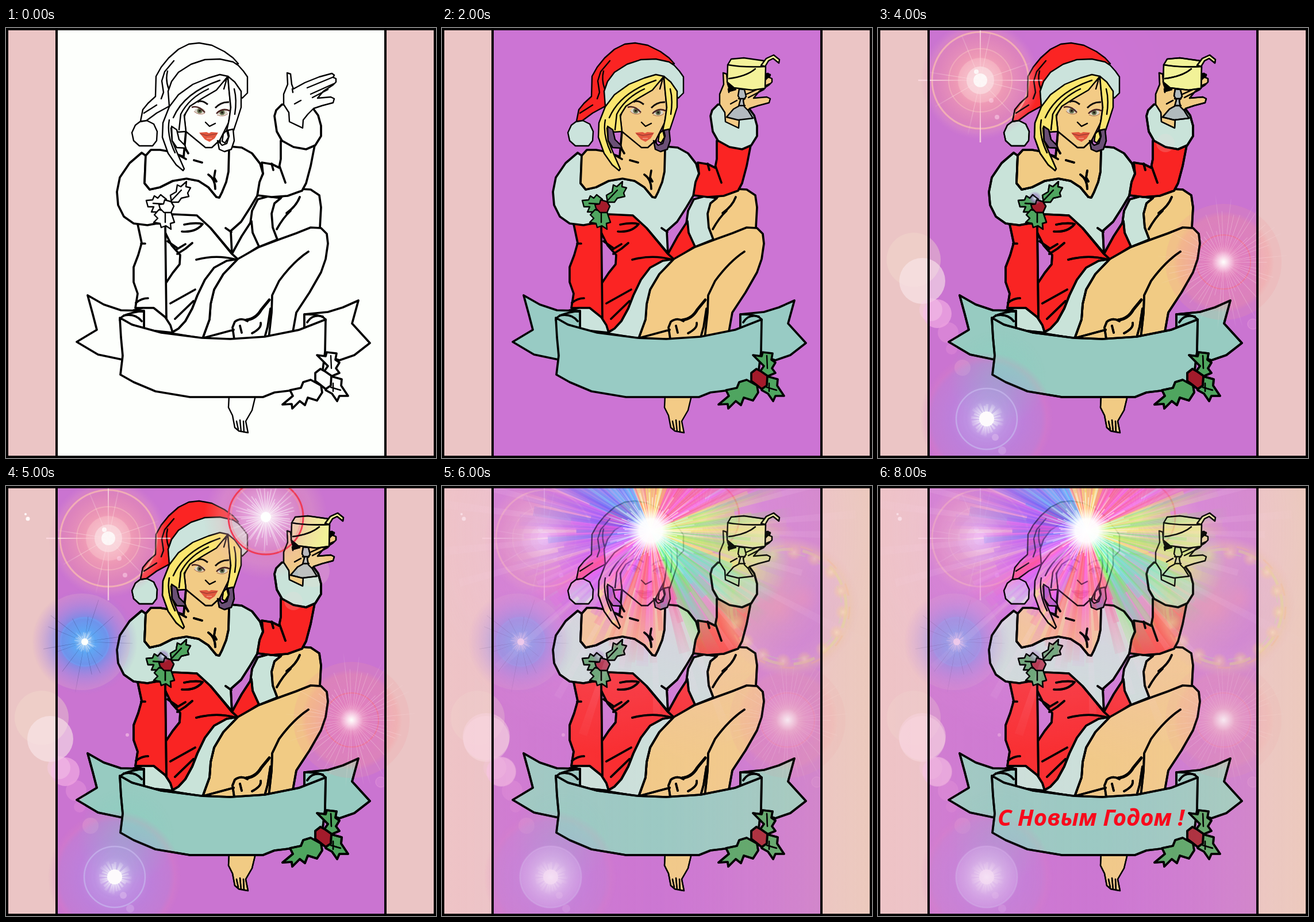
Animation of 748 by 748 pixels, one loop 9000 ms. Source, as an HTML page:

```html
<!DOCTYPE html>
<html lang="ru">
<head>
<meta charset="utf-8">
<title>С Новым Годом</title>
<style>
html, body { margin: 0; width: 100%; height: 100%; overflow: hidden; background: #ebc5c5; }
svg { display: block; width: 100vw; height: 100vh; }
.art path { stroke: #000; stroke-width: 3.7; stroke-linejoin: round; stroke-linecap: round; }
.art .thin path, .art path.thin { stroke-width: 2.4; }
.line { fill: none; }
.bg { fill: var(--bg, #fdfffc); }
.red { fill: var(--red, #fdfffc); }
.fur { fill: var(--fur, #fdfffc); }
.skin { fill: var(--skin, #fdfffc); }
.hair { fill: var(--hair, #fdfffc); }
.ring { fill: var(--ring, #fdfffc); }
.leaf { fill: var(--leaf, #fdfffc); }
.berry { fill: var(--berry, #fdfffc); }
.band { fill: var(--band, #fdfffc); }
.drink { fill: var(--drink, #fdfffc); }
.stem { fill: var(--stem, #fdfffc); }
.full {
  --bg: #cc74d4; --red: #fb2423; --fur: #cbe3dc; --skin: #f3cb86; --hair: #fbe66f; --ring: #6b4f76;
  --leaf: #4fa560; --berry: #a41b2b; --band: #98cbc4; --drink: #f4f29a; --stem: #b3bac0;
}
.ink { mix-blend-mode: multiply; }
.step { opacity: 0; animation: 9s step-end infinite; }
.paint { animation-name: paint; }
.glass { animation-name: glass; }
.fx1 { animation-name: fx1; }
.fx2 { animation-name: fx2; }
.fx3 { animation-name: fx3; }
.fx4 { animation-name: fx4; }
.fx5 { animation-name: fx5; }
.fx6 { animation-name: fx6; }
.flash { animation-name: flash; }
.text { animation-name: text; }
.kiss { animation-name: kiss; }
#flares { animation: dim 9s step-end infinite; }
@keyframes paint { 0% { opacity: 0 } 11.111%, to { opacity: 1 } }
@keyframes glass { 0% { opacity: 0 } 22.222%, to { opacity: 1 } }
@keyframes fx1 { 0% { opacity: 0 } 33.333%, to { opacity: 1 } }
@keyframes fx2 { 0% { opacity: 0 } 38.888%, to { opacity: 1 } }
@keyframes fx3 { 0% { opacity: 0 } 44.444%, to { opacity: 1 } }
@keyframes fx4 { 0% { opacity: 0 } 50%, to { opacity: 1 } }
@keyframes fx5 { 0% { opacity: 0 } 55.555%, to { opacity: 1 } }
@keyframes fx6 { 0% { opacity: 0 } 61.111%, to { opacity: 1 } }
@keyframes flash { 0% { opacity: 0 } 66.666%, to { opacity: 1 } }
@keyframes dim { 0% { opacity: 1 } 66.666%, to { opacity: .65 } }
@keyframes text { 0% { opacity: 0 } 72.222%, to { opacity: 1 } }
@keyframes kiss { 0% { opacity: 0 } 77.777% { opacity: 1 } 88.888%, to { opacity: 0 } }
text { font: italic 700 40px "Open Sans", "Noto Sans", sans-serif; fill: #f80a1c; }
</style>
</head>
<body>
<svg viewBox="0 0 748 748">
<defs id="defs"></defs>
<defs>
<g id="art" class="art">
  <rect class="bg" x="88" y="3" width="572" height="742"/>
  <!-- far leg and skirt edge -->
  <path class="skin" d="M465 302 490 288 512 280 530 281 545 291 548 312 546 348 530 352 472 370 462 345 462 320Z"/>
  <path class="line" d="M471 350Q482 330 495 318M511 294Q505 310 488 322"/>
  <path class="fur" d="M438 298 456 293 478 296 467 305 462 323 464 347 472 368 440 381 430 362 425 340 428 318Z"/>
  <!-- raised arm -->
  <path class="red" d="M437 291 440 268 447 254 445 234 463 237 475 243 478 228 478 196 537 204 530 240 522 270 515 283 490 292 462 294Z"/>
  <path class="line" d="M476 241 486 269M462 236 465 247"/>
  <path class="fur" d="M480 133 470 143 467 153 471 180 480 196 500 207 522 211 538 204 548 188 548 170 543 152 532 137Z"/>
  <g class="thin">
    <path class="skin" d="M489 78 495 80 497 98 500 106 520 95 545 85 567 79 571 82 569 86 574 88 574 94 569 99 552 110 542 122 565 120 571 123 569 130 550 135 535 140 525 150 517 160 516 174 493 163 492 147 483 133 483 115 490 98Z"/>
    <path class="line" d="M570 85 524 104M570 97 530 115M560 107 533 121M502 132 513 126M498 106 499 112"/>
  </g>
  <!-- dress -->
  <path class="red" d="M393 393 410 362 427 336 429 356 440 380 404 403Z"/>
  <path class="red" d="M270 340 292 323 333 323 356 348 393 393 404 403 384 405 362 417 346 438 333 465 324 488 312 510 300 523 289 529 278 505 278 444 290 426 302 411 303 395 288 378 279 360Z"/>
  <path class="red" d="M229 341 236 374 230 395 222 416 222 442 229 462 225 487 256 487 279 505 277 340Z"/>
  <path class="fur" d="M222 491 238 487 257 487 277 503 286 517 290 530 240 525Z"/>
  <path class="line" d="M306 354Q330 356 342 341Q330 338 310 342M330 322 341 328M281 371 297 382M298 393 312 384 324 374M297 385 312 376M331 403Q365 394 397 402M286 479 329 455M294 506 326 475M235 375 242 375M226 478Q236 470 247 470"/>
  <!-- near leg -->
  <path class="skin" d="M403 402 440 381 480 366 505 357 530 347 548 348 558 358 560 375 556 402 548 425 528 460 505 495 496 545 342 540 354 507 356 480 362 455 378 428Z"/>
  <path class="fur" d="M403 402 384 405 362 417 346 438 333 465 324 488 312 510 300 523 287 531 342 540 354 507 356 480 362 455 378 428Z"/>
  <path class="line" d="M526 389Q500 406 475 440L463 465 462 495 457 540M344 539 396 525M397 541 394 521 398 511Q409 503 420 510M407 518 410 530M443 513Q445 522 428 531M450 538 455 520 460 488"/>
  <path class="line" style="stroke-width:5" d="M418 508Q435 506 444 490L458 473"/>
  <g class="thin">
    <path class="skin" d="M388 640 387 660 394 674 398 695 405 701 421 704 417 684 428 665 434 640Z"/>
    <path class="line" d="M401 684 404 698M407 682 409 702M413 684 414 703"/>
  </g>
  <!-- collar and chest -->
  <path class="fur" d="M236 217 215 235 198 260 193 285 195 308 205 328 222 340 246 343 262 340 290 324 332 326 356 348 393 392 391 353 409 337 425 312 437 292 441 268 447 253 442 236 428 218 410 208 388 206 376 285 371 295 366 294 352 277 335 266 314 262 290 266 268 277 250 281 241 270 243 222Z"/>
  <path class="skin" d="M313 180 309 224 285 215 268 212 252 212 243 222 241 270 250 281 268 277 290 266 314 262 335 266 352 277 366 294 371 295 376 285 383 268 387 250 388 212 372 206 372 190Z"/>
  <path class="line" d="M310 206 317 218M327 230 341 234M304 223 313 228M364 248 362 260 366 267M352 255Q364 263 364 280M382 348 392 355"/>
  <!-- head -->
  <g class="thin">
    <path class="red" d="M234 162 238 142 247 131 260 119 261 84 270 68 283 52 300 37 318 28 336 26 358 30 380 41 395 52 404 62 372 70 320 90 284 136 262 148 243 162Z"/>
    <path class="line" d="M270 123 274 112 271 92 276 76 292 57M281 75Q277 90 283 106M240 148 262 134"/>
    <path class="fur" d="M233 163 245 161 257 167 263 180 262 196 255 205 232 205 222 196 219 182 225 169Z"/>
    <path class="fur" d="M282 110 288 93 300 77 322 63 346 55 372 54 395 59 404 65 413 75 420 85 420 113 411 122 390 100 300 125 284 136Z"/>
    <path class="skin" d="M313 180 330 194 347 208 358 208 372 195 387 165 391 140 386 88 340 118 316 138 310 155Z"/>
    <path class="hair" d="M386 84 398 94 409 110 409 138 402 160 396 178 384 178 388 160 391 138 388 108Z"/>
    <path class="ring" d="M395 176 397 196 392 211 380 215 371 211 368 196 376 204 384 201 388 188 386 178Z"/>
    <path class="hair" d="M378 184 384 178 387 190 381 200 376 197Z"/>
    <path class="hair" d="M386 84 372 81 352 87 325 98 300 116 284 137 273 165 272 190 282 218 296 238 308 248 310 245 299 220 289 196 287 174 300 181 313 180 310 152 320 136 342 122 366 108Z"/>
    <path class="ring" d="M288 171 297 177 301 194 311 204 313 209 297 208 289 196Z"/>
    <path class="line" d="M372 91Q310 112 291 156M352 106Q318 122 304 150L301 177M284 160Q279 186 294 217M383 92 379 106M397 106Q402 125 398 150M347 164 354 171 364 166"/>
  </g>
  <!-- holly -->
  <g class="thin">
    <path class="leaf" d="M286 291 296 285 298 273 304 276 314 267 313 276 321 278 316 287 318 293 305 296 300 303 288 303Z"/>
    <path class="leaf" d="M244 300 255 299 258 292 264 296 269 290 279 298 274 310 264 320 253 320 257 311 247 311Z"/>
    <path class="leaf" d="M266 316 258 325 264 331 257 338 268 340 270 347 278 344 287 350 286 340 293 338 287 320Z"/>
    <path class="line" d="M288 300 305 282M256 305 272 306M277 323 277 338"/>
    <path class="berry" d="M266 307 274 306 276 299 287 302 292 310 287 321 275 321 268 314Z"/>
  </g>
  <!-- ribbon -->
  <path class="band" d="M240 492 200 491 170 481 142 465 151 498 158 525 123 546 160 568 203 577V530L240 530Z"/>
  <path class="band" d="M519 498 560 494 586 486 613 474 602 514 633 548 606 569 580 578 556 570 519 530Z"/>
  <path class="band" d="M198 508Q200 497 240 492V524ZM556 508Q552 498 519 498V524Z"/>
  <path class="line" d="M205 500Q225 496 236 510M551 502Q533 497 524 512"/>
  <path class="band" d="M198 504 219 516 270 530 340 539 390 541 450 537 510 525 556 507 555 563 548 618 500 630 467 634 447 642 320 642 260 632 222 616 199 603 203 570 200 538Z"/>
  <path class="leaf" d="M541 569 556 571 558 564 575 566 573 577 580 582 574 592 580 600 566 606 553 598 560 588 553 581Z"/>
  <path class="leaf" d="M566 606 584 611 583 622 595 640 580 640 576 649 567 636 556 630Z"/>
  <path class="leaf" d="M548 622 530 612 517 616 513 626 494 630 499 640 481 655 497 654 498 662 511 649 520 656 525 643 541 648 550 634Z"/>
  <path class="berry" d="M538 600 547 593 556 598 566 605 565 622 556 628 546 620 538 614Z"/>
  <path class="line thin" d="M565 570 566 592M569 618V632M565 625 582 630"/>
</g>
<g id="eyes" fill="none">
  <path stroke="#100c0c" stroke-width="3" d="M333 129Q340 124 351 133M364 139Q374 128 388 129"/>
  <ellipse cx="337" cy="144" rx="9" ry="5" fill="#d9d2c7"/>
  <ellipse cx="376" cy="147" rx="9" ry="5" fill="#d9d2c7"/>
  <circle cx="337" cy="144" r="4.5" fill="#63704f"/>
  <circle cx="376" cy="147" r="4.5" fill="#63704f"/>
  <circle cx="337" cy="144" r="2" fill="#201815"/>
  <circle cx="376" cy="147" r="2" fill="#201815"/>
  <path stroke="#4a2524" stroke-width="2.5" d="M323 138Q335 134 346 147M366 149Q376 138 389 144"/>
  <path stroke="#a36853" d="M327 145Q336 153 346 148M367 151Q378 156 386 149"/>
  <path fill="#e2573f" d="M336 182 349 181 353 183 357 181 369 182 363 192 354 198 346 194Z"/>
  <path stroke="#a23d32" stroke-width="1.4" d="M338 184 349 187 367 184"/>
  <path stroke="#f49a83" stroke-width="1.5" d="M349 192H358"/>
</g>
<g id="cup" class="art">
  <g class="thin">
    <path fill="#000" d="M562 80 571 81 563 90ZM498 96 511 107 500 110Z"/>
    <path class="stem" d="M517 106 515 118 519 125 516 136 507 141 495 155 515 160 541 157 533 144 526 137 524 126 529 119 526 107Z"/>
    <path class="drink" d="M497 64 503 54 525 52 560 57 563 67 562 105 540 108 508 104 496 94Z"/>
    <path class="line" d="M497 64Q525 69 562 67M499 88Q530 84 545 71M516 123H527M517 135H527"/>
    <path class="drink" d="M555 65 564 53 577 47 587 55 586 61 576 53 568 57 562 67Z"/>
  </g>
</g>
</defs>

<rect width="748" height="748" fill="#ebc5c5"/>
<use href="#art"/>
<use href="#art" class="full step paint"/>
<use href="#eyes"/>
<use href="#cup" class="full step glass"/>

<g id="flares"></g>
<g id="burst" class="step flash"></g>

<!-- outlines stay dark under the light -->
<g class="step fx1 ink" mask="url(#inkMask)"><use href="#art"/><use href="#cup"/></g>

<path fill="none" stroke="#000" stroke-width="4" d="M2 2H746V746H2ZM88 2V746M660 2V746"/>
<g class="step kiss">
  <path fill="#e23b58" d="M336 184 347 180 353 182 359 180 369 184 364 193 354 198 343 194Z"/>
  <path fill="none" stroke="#8e2440" stroke-width="1.5" d="M338 186Q353 190 367 186"/>
</g>
<text class="step text" x="208" y="591">С Новым Годом !</text>
</svg>

<script>
const $ = id => document.getElementById(id);
let seed = 11, ids = 0, gradients = '', flares = '';

const rand = () => (seed = seed * 16807 % 2147483647) / 2147483647;
const polar = (x, y, r, a) => (x + r * Math.cos(a)).toFixed(1) + ' ' + (y + r * Math.sin(a)).toFixed(1);

// Radial gradient; each stop is "offset colour".
function glow(x, y, r, ...stops) {
  const id = 'g' + ids++;
  gradients += `<radialGradient id="${id}" gradientUnits="userSpaceOnUse" cx="${x}" cy="${y}" r="${r}">` +
    stops.map(s => s.split(' ')).map(([o, c]) => `<stop offset="${o}" stop-color="${c}"/>`).join('') +
    '</radialGradient>';
  return `url(#${id})`;
}
const disc = (x, y, r, fill, stroke = 'none', w = 1, extra = '') =>
  `<circle cx="${x}" cy="${y}" r="${r}" fill="${fill}" stroke="${stroke}" stroke-width="${w}" ${extra}/>`;
const halo = (x, y, r, ...stops) => disc(x, y, r, glow(x, y, r, ...stops));
const ray = (x, y, r, a, w) => `M${x} ${y}L${polar(x, y, r, a - w)} ${polar(x, y, r, a + w)}Z`;

function star(x, y, n, r, w, color, min = .4) {
  let d = '';
  for (let i = 0; i < n; i++)
    d += ray(x, y, r * (min + (1 - min) * rand()), (i + rand() * .7) * 2 * Math.PI / n, w);
  return `<path d="${d}" fill="${glow(x, y, r, '0 ' + color, '1 ' + color.slice(0, 7) + '00')}"/>`;
}
const layer = (name, ...parts) => flares += `<g class="step ${name}">${parts.join('')}</g>`;

layer('fx1',
  halo(178, 91, 104, '0 #fff0f4', '.4 #f6a0b6d0', '.75 #ee8fac88', '.88 #f0a0c044', '1 #e090d000'),
  disc(178, 91, 55, '#f5a0a633', '#fac3c077', 2),
  disc(178, 91, 84, 'none', '#ffc4b0aa', 3),
  disc(178, 91, 39, '#fbc4ce77'), disc(178, 91, 24, '#fde0e6aa'), disc(178, 91, 12, '#fff7fa'),
  disc(171, 76, 4, '#fff7fa'),
  `<path d="${[0, 1, 2, 3].map(i => ray(178, 91, 108, i * Math.PI / 2, .012)).join('')}" fill="#ffdbe4cc"/>`,
  star(178, 91, 8, 100, .012, '#ffe3e8cc', .8),
  disc(197, 126, 4, '#ffd5ec88'), disc(207, 155, 4, '#ffd5ec88'),
  halo(273, 296, 12, '0 #e0eefa', '.5 #9d80c4bb', '1 #9d80c400'));

layer('fx2',
  disc(601, 407, 101, '#f59aa030'),
  halo(601, 407, 88, '0 #ffdbe8', '.35 #ee86b888', '.55 #ee86b866', '.9 #f7949b44', '1 #f7949b00'),
  disc(601, 407, 47, '#e87fc022', '#f46f8899', 2),
  star(601, 407, 50, 120, .006, '#ffeef2cc'), halo(601, 407, 20, '0 #fff', '1 #ffd5f000'),
  disc(652, 515, 9, '#e89be044', '#f0a5e088'), disc(500, 200, 16, '#f7dadc33'));

layer('fx3',
  disc(62, 403, 47, '#f2dcce66'), disc(77, 440, 40, '#fbe8ec99'),
  disc(103, 497, 25, '#f8b5e899'), disc(92, 490, 20, '#f9ccec66'),
  disc(122, 530, 18, '#ef9fe066'), disc(147, 591, 14, '#f0a0d866'), disc(128, 558, 10, '#e994df55'),
  halo(189, 680, 116, '0 #f4eaff', '.3 #bba0ee99', '.55 #b18ce877', '.82 #b191e044', '.9 #dd83c844', '1 #dd83c800'),
  halo(208, 610, 85, '0 #78d5c255', '1 #78d5c200'),
  disc(189, 680, 53, '#b59ceb22', '#c9b9f0aa', 2.5),
  star(189, 680, 24, 32, .09, '#ffffffdd', .7), disc(189, 680, 13, '#fffaff'),
  disc(204, 712, 6, '#dcb8ef99'), disc(216, 735, 7, '#dcb8ef66'));

layer('fx4',
  halo(452, 54, 108, '0 #fff', '.3 #f0b8ddaa', '.6 #e995b866', '.75 #f0b3b944', '1 #f0b3b900'),
  disc(452, 54, 65, 'none', '#f13c56', 3), disc(452, 54, 61, 'none', '#f793a588', 3),
  star(452, 54, 48, 72, .022, '#ffffffee'), disc(452, 54, 9, '#fff'),
  disc(535, 148, 28, '#f5e0cc33'));

layer('fx5',
  disc(132, 271, 84, '#efc1c83d'),
  halo(137, 271, 92, '0 #d6eaff', '.2 #64a7f6', '.45 #668cefcc', '.7 #9483ea77', '1 #b080e000'),
  disc(137, 271, 42, '#55a5f744', '#739ff788', 3),
  star(137, 271, 15, 95, .006, '#202050cc'), star(137, 271, 24, 24, .05, '#ffffffee'),
  disc(137, 271, 6, '#fff'), disc(38, 57, 3.5, '#fff8f8'), disc(34, 49, 2, '#fff8f8'),
  disc(211, 433, 3, '#eaa7e2'));

const beads = Array.from({ length: 16 }, (_, i) => {
  const [x, y] = polar(603, 210, 95, i * Math.PI / 8 + .1).split(' ').map(Number);
  return halo(x, y, 14, '0 #ffeab0cc', '.5 #f5c58888', '1 #f5c58800');
});
layer('fx6',
  halo(603, 210, 122, '0 #c96bd777', '.55 #c380e655', '.78 #d99bd988', '.88 #e8c09a88', '1 #e8b0c000'),
  disc(603, 210, 100, 'none', '#d9df7aaa', 5, 'stroke-dasharray="38 17"'),
  disc(603, 210, 106, 'none', '#f5ae7a88', 3, 'stroke-dasharray="22 30"'),
  disc(603, 210, 92, 'none', '#a9e59a77', 2, 'stroke-dasharray="30 24"'),
  halo(588, 212, 32, '0 #ee79bb99', '1 #ee79bb00'), halo(628, 196, 28, '0 #ee79bb99', '1 #ee79bb00'),
  ...beads);

// Rainbow burst over the hat; hues run clockwise from the right.
const hues = [85, 140, 330, 300, 265, 210, 45, 335], rays = 150;
let rainbow = '';
for (let i = 0; i < rays; i++) {
  const hue = hues[Math.round(i / rays * 8) % 8] + rand() * 60 - 30;
  const d = ray(363, 78, 100 + 190 * rand(), i / rays * 2 * Math.PI, .015 + .035 * rand());
  rainbow += `<path d="${d}" fill="hsl(${hue.toFixed()} 100% 64% / .6)"/>`;
}
const mask = (id, fill) => `<mask id="${id}" maskUnits="userSpaceOnUse" x="0" y="0" width="748" height="748">
  <rect width="748" height="748" fill="${fill}"/></mask>`;
const masks = mask('fade', glow(363, 78, 250, '0 #fff', '.35 #ccc', '.65 #666', '1 #000')) +
  mask('inkMask', glow(363, 78, 140, '0 #000', '.35 #000', '1 #e8e8e8'));
const wash = `<linearGradient id="wash"><stop stop-color="#ffc0d0" stop-opacity=".16"/>
  <stop offset=".5" stop-color="#ffb0f0" stop-opacity=".05"/>
  <stop offset="1" stop-color="#efd9a8" stop-opacity=".26"/></linearGradient>`;

$('burst').innerHTML = [
  '<rect width="748" height="748" fill="url(#wash)"/>',
  halo(178, 91, 85, '0 #fff5fa99', '.5 #e0b5dd66', '1 #e0a0d000'),
  halo(601, 407, 50, '0 #fff5faaa', '.4 #f5c5d055', '1 #f0a0d033'),
  halo(189, 680, 56, '0 #fff5ff88', '.9 #dfb8f055', '1 #dfb8f000'),
  disc(77, 436, 41, '#f8d4e077'), disc(103, 497, 26, '#f8c5e466'),
  halo(510, 180, 150, '0 #ffd53055', '.5 #ffe06033', '1 #ffe08000'),
  halo(520, 130, 85, '0 #b8ff7077', '.6 #a8f5b044', '1 #a0ffe000'),
  halo(363, 78, 400, '0 #fff', '.12 #ffd0f6a0', '.3 #f2a8ff66', '.5 #f5b0f033', '1 #f0b0ee00'),
  star(363, 78, 34, 430, .02, '#ffd9f544'),
  `<g mask="url(#fade)">${rainbow}</g>`,
  star(363, 78, 70, 105, .022, '#ffffffee', .35),
  halo(363, 78, 40, '0 #fff', '.5 #ffffffee', '1 #ffffff00')
].join('');
$('flares').innerHTML = flares;
$('defs').innerHTML = gradients + masks + wash;
</script>
</body>
</html>
```
